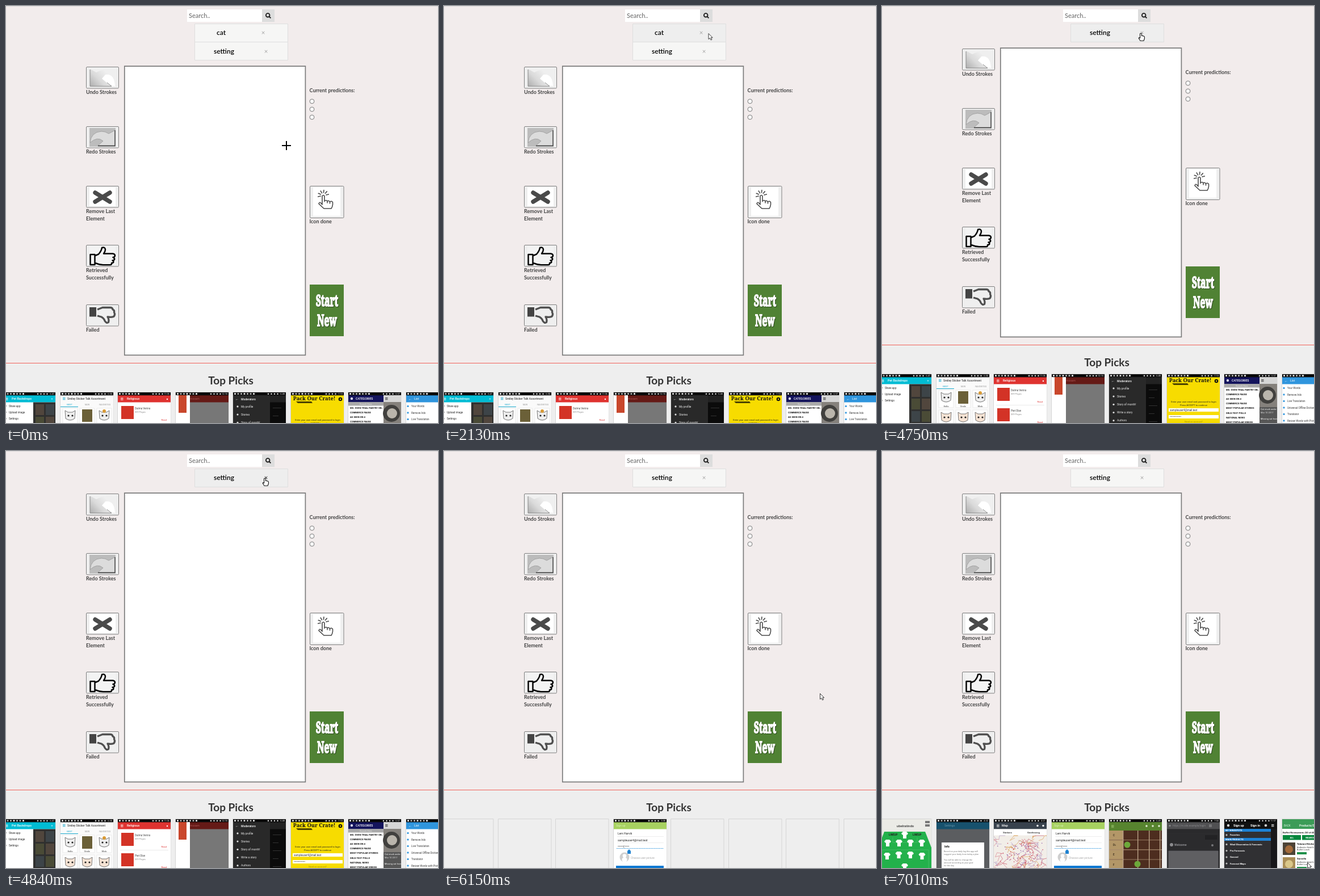
An HTML page with a canvas that plays this animation: 761 px wide and 735 px high, repeating every 7.08 s.

```html
<!DOCTYPE html>
<html lang="en">
<head>
<meta charset="utf-8">
<title>Sketch search</title>
<style>
html, body { margin: 0; width: 100%; height: 100%; overflow: hidden; background: #f2ecec; }
canvas { display: block; }
</style>
</head>
<body>
<canvas id="stage" width="761" height="735"></canvas>
<script>
const c = document.getElementById('stage').getContext('2d');
const LOOP = 7080, STEP = 1000 / 15, REMOVED = 70, REFRESH = 91;

const box = (x, y, w, h, fill) => { c.fillStyle = fill; c.fillRect(x, y, w, h); };
const dot = (x, y, r, fill) => { c.fillStyle = fill; c.beginPath(); c.arc(x, y, r, 0, 7); c.fill(); };
function frame(x, y, w, h, fill, edge, lw = 1, r = 0) {
  c.beginPath(); c.roundRect(x, y, w, h, r);
  c.fillStyle = fill; c.fill();
  c.strokeStyle = edge; c.lineWidth = lw; c.stroke();
}
function shape(d, fill, edge, lw = 1) {
  const p = new Path2D(d);
  if (fill) { c.fillStyle = fill; c.fill(p); }
  if (edge) { c.strokeStyle = edge; c.lineWidth = lw; c.stroke(p); }
}
function text(s, x, y, size, fill = '#444', weight = 700, align = 'left', family = 'Lato, sans-serif') {
  c.font = `${weight} ${size}px ${family}`;
  c.textAlign = align; c.fillStyle = fill; c.fillText(s, x, y);
}
const tiny = (s, x, y, fill = '#222', size = 4.6, weight = 400, align = 'left') =>
  text(s, x, y, size, fill, weight, align, 'Roboto, sans-serif');
function at(x, y, draw) { c.save(); c.translate(x, y); draw(); c.restore(); }
function random(seed) { return () => (seed = seed * 16807 % 2147483647) / 2147483647; }

// ---- pointer -------------------------------------------------------------
const PATH = [
  [0, 494, 246], [4, 553, 150], [9, 536, 30], [11, 536, 30], [14, 482, 35], [16, 482, 35],
  [17, 484, 31], [19, 480, 34], [20, 480, 34], [28, 466, 46], [29, 466, 46], [32, 465.5, 48],
  [35, 462, 74], [37, 460, 66], [40, 452, 51], [45, 452, 51], [46, 456, 51.5], [48, 456, 51.5],
  [49, 456, 49.5], [53, 456, 49.5], [55, 456, 47.5], [89, 456, 47.5], [90, 540, 180], [92, 662, 427],
  [96, 748, 722], [101, 748, 722], [105, 749, 725]
];
function pointer(k) {
  const i = PATH.findIndex(p => p[0] > k);
  if (i < 0) return PATH.at(-1).slice(1);
  const [a, x, y] = PATH[i - 1], [b, u, v] = PATH[i], f = (k - a) / (b - a);
  return [x + (u - x) * f, y + (v - y) * f];
}
function drawPointer(k, x, y) {
  c.lineJoin = 'round';
  at(x, y, () => {
    if (k >= 46 && k < 90)
      shape('M-1.4 7V1.3Q0 -.3 1.4 1.3V5Q3 4.2 3.5 5.4Q5 4.8 5.3 6Q6.4 5.8 6.4 7.4V10L5 13.8H-1L-3.8 9.3Q-4 7.6-1.4 9Z', '#fff', '#111', 1.1);
    else if (x > 209 && x < 527 && y > 107 && y < 615) {
      box(-8, -1, 16, 2, '#000'); box(-1, -8, 2, 16, '#000');
    } else
      shape('M.5 .5V10.5L2.9 8.5L4.6 12L6.4 11.2L4.8 7.8H7.7Z', '#fff', '#222', .9);
  });
}

// ---- search bar and list ---------------------------------------------------
function drawSearch(k, x, y) {
  box(319, 6, 132, 22, '#fff');
  box(451, 6, 22, 22, '#ddd');
  text('Search..', 322, 20.5, 11, '#707070', 500);
  c.strokeStyle = '#222'; c.lineWidth = 1.9;
  c.beginPath(); c.arc(461.2, 16.2, 3.3, 0, 7); c.moveTo(463.5, 18.5); c.lineTo(466.4, 21.4); c.stroke();

  const gone = k >= REMOVED;
  const items = gone ? [['setting', 384, 458]] : [['cat', 379, 453], ['setting', 384, 458]];
  items.forEach(([word, tx, cx], i) => {
    const top = 31 + i * 32.5;
    const over = k !== REMOVED && x > 332 && x < 496 && y > 32 && y > top && y <= top + 32.5;
    const hot = over && (gone ? k >= 72 : i === 0 && k >= 41);
    frame(332.5, Math.floor(top) + .5, 164, 32, over ? '#eee' : '#f6f6f5', '#dedede');
    text(word, tx, top + 20.3, 12, '#000', 600, 'center');
    text('×', cx, top + 20, 11.5, hot ? '#222' : '#a5a5a5', 400, 'center');
  });
}

// ---- tool buttons ----------------------------------------------------------
const TOOLS = [
  ['Undo Strokes', () => {
    box(6, 3, 46, 33, '#f0f0f0');
    const g = c.createLinearGradient(8, 34, 34, 8);
    g.addColorStop(0, '#b0b0b0'); g.addColorStop(.5, '#dadada'); g.addColorStop(1, '#efefef');
    shape('M7 4L18 10Q32 2 51 5V34Q48 20 33 18L30 21L37 28L45 34H7Z', g);
    shape('M34 14Q50 12 51 34L42 33L28 21Z', '#fff');
    shape('M7 5V34.5H45L37 28', null, '#888', 1);
  }],
  ['Redo Strokes', () => {
    box(6, 3, 46, 33, '#bcbcbc');
    shape('M7 29Q9 10 27 9Q34 9 40 13L51 7V34H21L30 26Q20 17 7 29Z', '#dcdcdc', '#999', .8);
    shape('M51 7V34.5H21', null, '#444', 1.4);
  }],
  ['Remove Last|Element', () => {
    box(6, 3, 46, 33, '#fff');
    c.lineCap = 'round';
    shape('M16 12L42 28M42 12L16 28', null, '#4a4a4a', 7.4);
    c.lineCap = 'butt';
  }],
  ['Retrieved|Successfully', () => {
    box(6, 3, 46, 33, '#f3f3f3');
    c.lineJoin = 'round';
    shape('M7.5 17H15.5V35H7.5ZM16 19L22 16.5Q27 11 28 5Q33 3 34 8Q34 12 31 15.5H47Q51 16 51 19Q50.5 22 47.5 22Q51 23.5 50 26Q49 27.5 46.5 27.5Q49.5 29 48 31Q47 32 45 32Q46 35 42 35.3H30Q23 35 16 32', null, '#050505', 2.5);
  }],
  ['Failed', () => {
    box(6, 5, 12, 16.5, '#444');
    c.lineJoin = 'round';
    shape('M20 9L29 5.5H43Q47 6 47 9Q50.5 10 49.5 14Q52 18 48.5 21.5Q45 23 38 22Q41 27 39.5 31.5Q36 34 33 29Q32 25 27 22L20 20', null, '#505050', 3.3);
  }]
];
function drawTools() {
  TOOLS.forEach(([label, icon], i) => at(141, 107 + Math.round(i * 104.8), () => {
    frame(.5, .5, 57, 37.5, '#efefef', '#808080', 1, 1.5);
    icon();
    label.split('|').forEach((s, n) => text(s, 0, 48 + n * 12.6, 9));
  }));
}

function drawPanel() {
  frame(208.8, 106.2, 318.6, 509.2, '#fff', '#7c7c7c', 1.7);
  drawTools();
  text('Current predictions:', 534.5, 151.5, 9);
  for (const y of [168, 182, 196]) {
    c.beginPath(); c.arc(539, y, 3.9, 0, 7);
    c.fillStyle = '#fff'; c.fill(); c.strokeStyle = '#777'; c.lineWidth = 1; c.stroke();
  }
  frame(535.5, 317.5, 59.5, 56, '#efefef', '#808080', 1, 1.5);
  box(541, 320, 48, 50, '#fff');
  at(559, 333, () => {
    c.lineCap = 'round';
    shape('M-2 17V2Q0-1 2 2V11Q5 8 7 11Q9 9 11.5 12Q15 10 16.5 13V17Q16 21 14 24H1L-8 15.5Q-7 12-4.5 14L-2 17M7 11V14M11.5 12V15', null, '#4a4a4a', 1.6);
    for (let i = 0; i < 6; i++) {
      const a = Math.PI * (.93 + i * .2);
      c.beginPath();
      c.moveTo(5 * Math.cos(a), 1 + 5 * Math.sin(a));
      c.lineTo(9.5 * Math.cos(a), 1 + 9.5 * Math.sin(a));
      c.stroke();
    }
    c.lineCap = 'butt';
  });
  text('Icon done', 534.5, 383.3, 9);

  box(535, 491, 60, 91, '#508234');
  for (const [word, y] of [['Start', 529], ['New', 564]])
    at(566, y, () => {
      c.scale(1, 1.7);
      c.lineWidth = 1.2;
      for (const [o, fill] of [[1, '#2c4a1c'], [0, '#fff']]) {
        text(word, o - .5, o * .4, 15.5, fill, 900, 'center', '"Noto Serif", serif');
        c.strokeStyle = fill; c.strokeText(word, o - .5, o * .4);
      }
    });
}

// ---- picks -----------------------------------------------------------------
function statusBar(time) {
  box(0, 0, 93, 5.3, '#080808');
  for (let i = 0; i < 7; i++) box(2 + i * 5.5, 1.2, 3, 2.8, i % 3 ? '#aaa' : '#ddd');
  for (let i = 0; i < 4; i++) dot(62 + i * 5.5, 2.7, 1.3, '#ddd');
  tiny(time, 91, 4.2, '#fff', 4, 400, 'right');
}
const burger = (x, y, fill = '#fff') => { for (let i = 0; i < 3; i++) box(x, y + i * 1.7, 4.5, .8, fill); };
function menu(items, x, y, gap, fill, icon, size = 4.6, weight = 400) {
  items.forEach((s, i) => {
    if (icon) dot(x - 6, y + i * gap - 1.6, 1.6, icon);
    tiny(s, x, y + i * gap, fill, size, weight);
  });
}
function app(time, bg, head, title, tx = 16) {
  box(0, 0, 93, 160, bg);
  box(0, 5, 93, 12.5, head);
  statusBar(time);
  if (title) { burger(5, 9.5); tiny(title, tx, 13.3, '#fff', 5.4, 500); }
}

const FIRST = [
  () => {
    app('6:47', '#fff', '#00bcd4', 'Pet Backdrops');
    box(54, 17.5, 39, 150, '#30302f');
    for (let i = 0; i < 8; i++)
      box(58 + i % 2 * 18, 21 + (i >> 1) * 22, 15, 19, ['#51463d', '#3d4448', '#4a4b36'][i % 3]);
    dot(87, 11.5, 1.2, '#9de');
    menu(['Share app', 'Upload image', 'Settings'], 11, 25.5, 11.2, '#222', '#555');
  },
  () => {
    box(0, 0, 93, 160, '#fafafa'); statusBar('6:50');
    burger(4, 9, '#18a8cc');
    tiny('Smiley Sticker Talk Assortment', 12, 12.5, '#444', 4.8, 500);
    ['BEST', 'NEW', 'FAVORITES'].forEach((s, i) => tiny(s, 16 + i * 31, 22.8, i ? '#999' : '#18a8cc', 4, 400, 'center'));
    box(0, 25, 31, 1, '#18a8cc');
    for (let i = 0; i < 6; i++) {
      const x = 4 + i % 3 * 30, y = 28 + (i / 3 | 0) * 35;
      frame(x, y, 26, 31, '#fff', '#e2e2e2', .7);
      if (i === 1) box(x + 4, y + 2, 18, 22, '#6b6038');
      else {
        shape(`M${x + 4} ${y + 4}L${x + 9} ${y + 7}H${x + 17}L${x + 22} ${y + 4}L${x + 21} ${y + 18}Q${x + 13} ${y + 24} ${x + 5} ${y + 18}Z`, i > 2 ? '#f6e3d4' : '#eee', '#555', .8);
        dot(x + 10, y + 13, 1.6, '#222'); dot(x + 17, y + 13, 1.6, '#222');
        if (i === 2) dot(x + 13, y + 5, 3, '#d99a35');
      }
      tiny(['Hello', 'Smile', 'Wink'][i % 3], x + 13, y + 29.5, '#333', 4, 400, 'center');
    }
  },
  () => {
    app('11:06', '#fff', '#df3330', 'Religious');
    dot(87, 12, 1.2, '#fff');
    ['Dalma Verino', 'Piet Olan'].forEach((s, i) => at(0, i * 36, () => {
      box(6, 24, 22, 23, '#d33326');
      tiny(s, 30, 30, '#444'); tiny('309 Pages', 30, 36, '#888', 4);
      tiny('Read', 86, 50, '#d33', 4.2, 400, 'right');
      box(4, 54, 85, .6, '#ddd');
    }));
  },
  () => {
    app('12:18', '#777', '#651a16');
    tiny('mosam', 25, 13, '#a55', 5);
    box(0, 5, 25, 155, '#fff');
    box(5, 5, 14, 31, '#c9472c');
  },
  () => {
    app('6:48', '#0b0b0b', '#222');
    box(0, 5, 65, 155, '#292929');
    tiny('←', 4, 13.5, '#fff', 6); tiny('Moderators', 14, 13.5, '#fff', 5, 500);
    menu(['My profile', 'Stories', 'Story of month!', 'Write a story', 'Authors'], 14, 26.5, 14.2, '#eee', '#ddd', 4.9);
    for (let i = 0; i < 5; i++) box(70, 27 + i * 14, 15 - i % 2 * 5, .8, '#3c3c3c');
  },
  () => {
    box(0, 0, 93, 160, '#f7dc00'); statusBar('7:10');
    text('Pack Our Crate!', 41, 14, 9.3, '#111', 900, 'center', '"Noto Serif", serif');
    shape('M9 16H36L38 19H12Z', '#4b4300');
    dot(87, 12, 3.3, '#111'); dot(87, 12, 1.2, '#f7dc00');
    tiny('Enter your user email and password to login', 47, 50, '#222', 4.1, 400, 'center');
    tiny('Press ACCEPT to continue', 47, 55.5, '#222', 4.1, 400, 'center');
    box(3, 60, 88, 6, '#fff'); tiny('sampleuser4@mail.test', 5, 64.7);
    box(3, 72, 88, 6, '#fff'); tiny('•••••••••••••', 5, 76.6);
    tiny('Need an account?', 47, 85, '#a38f00', 4, 400, 'center');
  },
  () => {
    app('6:57', '#fff', '#14145c');
    box(62, 5, 31, 155, '#d6d6d6');
    burger(65, 9, '#333');
    tiny('CATEGORIES', 13, 13, '#fff', 5.2, 500); dot(6, 11, 2.2, '#dde');
    box(0, 17, 62, 6.5, '#aaa'); tiny('Search Here', 20, 22, '#eee', 4);
    menu(['MS. OVEN TRIAL PANTRY ON..', 'COMMERCE PAUSE', 'AS SEEN ON 4', 'COMMERCE PAUSE', 'MOST POPULAR STORIES', 'XKLD.TEST POLLS', 'NATIONAL NEWS', 'MOST POPULAR VIDEOS'], 3, 29, 8.1, '#111', null, 4.2, 700);
    box(62, 17, 31, 42, '#85817c');
    dot(76, 37, 15, '#41403e'); dot(77, 37, 9, '#bab5ac');
    box(62, 58, 31, 28, '#575757');
    tiny('Cat stuck under', 64, 63, '#fff', 4); tiny('Mar 10 2017', 64, 69, '#ddd', 4);
    tiny('Missing cat from', 64, 80, '#fff', 4);
  },
  () => {
    app('6:47', '#fff', '#2f95dd');
    tiny('←', 4, 13.5, '#fff', 6); tiny('List', 14, 13.3, '#fff', 5.2);
    menu(['Your Words', 'Remove Ads', 'Live Translation', 'Universal Offline Dictionary', 'Translator', 'Review Words with Pictures'], 9, 26, 11.5, '#333', '#2f95dd', 4.5);
  }
];

const SECOND = [
  () => {
    box(0, 0, 93, 160, '#ebebe6');
    tiny('ubelratindo', 47, 13.5, '#333', 6, 500, 'center');
    box(82, 3, 8, 4, '#777'); box(82, 9, 8, 4, '#777');
    shape('M0 160V48L10 22H82L93 50V160Z', '#23b14b');
    shape('M6 86V54H88V86M25 32V41H68V32', null, '#58c877', .6);
    tiny('LINEUP', 18, 29, '#222', 4.5, 700); tiny('LINEUP', 60, 29, '#222', 4.5, 700);
    const shirt = (x, y) => at(x, y, () => shape('M-6-3L-3-6H3L6-3L4 0L3-1V6H-3V-1L-4 0Z', '#fff'));
    shirt(46, 28);
    for (let i = 0; i < 4; i++) { shirt(16 + i * 20, 42); shirt(15 + i * 20.5, 63 - (i % 3 ? 0 : -2)); }
    shirt(46, 84);
  },
  () => {
    app('4:32', '#5b5d60', '#17516d');
    tiny('Settings', 14, 13.2, '#6693a8', 5);
    box(9, 41, 75, 90, '#fff');
    tiny('Info', 14, 50, '#111', 5, 700);
    menu(['Based on your daily log this app will', 'suggest your body from today a plan', '', 'You will be able to change the', 'amount according to your goal', 'for the day', '', 'Every week a new plan starts'], 13, 58, 5, '#777', null, 3.8);
  },
  () => {
    app('4:21', '#f2eee8', '#38424d', 'Map', 14);
    dot(77, 11.5, 1.7, '#fff'); dot(87, 11.5, 1.7, '#fff');
    box(0, 17.5, 93, 11, '#fff');
    tiny('Stations', 24, 25, '#222', 4.3, 500, 'center'); tiny('Geofencing', 70, 25, '#222', 4.3, 500, 'center');
    const r = random(77);
    for (let i = 0; i < 65; i++) {
      let x = 48 + (r() - .5) * 86, y = 64 + (r() - .5) * 66;
      c.strokeStyle = ['#d88792', '#b6a1c8', '#dca45c', '#c85e70'][i % 4]; c.lineWidth = .7;
      c.beginPath(); c.moveTo(x, Math.max(y, 29));
      for (let n = 0; n < 4; n++) c.lineTo(x += (r() - .5) * 23, Math.max(29, y += (r() - .5) * 20));
      c.stroke();
    }
    for (let i = 0; i < 75; i++) dot(48 + (r() + r() - 1) * 42, 64 + (r() + r() - 1) * 32, .8, i % 2 ? '#c53a54' : '#905aa8');
  },
  () => {
    app('5:08', '#fff', '#a7d160');
    tiny('Sign up', 4, 13, '#d8efb6', 5);
    tiny('Lem Harvik', 7, 27, '#222', 5); box(6, 30, 82, .5, '#ddd');
    tiny('sampleuser4@mail.test', 7, 38.5, '#222', 5); box(6, 41, 82, .5, '#ddd');
    tiny('••••••(•••••', 7, 49.5, '#222', 5);
    for (let x = 5; x < 88; x += 2.6) box(x, 51, 1.6, 1, '#3a9ce0');
    shape('M27 53L30 56V61H24V56Z', '#1f82d0');
    dot(19, 67, 8.5, '#cfcfcf'); dot(19, 64.5, 3.3, '#fff'); dot(19, 71.5, 4.5, '#fff');
    tiny('Choose user picture', 30, 70, '#aaa', 4.7);
    box(4, 82, 84, 12, '#0c78d2');
  },
  () => {
    app('6:49', '#4d2d1f', '#57842f');
    box(0, 5, 93, 15, '#57842f'); burger(4, 10.5, '#a9d17b');
    for (let i = 0; i < 3; i++) dot(66 + i * 11, 12, 1.8, '#e0ead2');
    box(0, 20, 24, 140, '#b39768');
    for (let i = 0; i < 4; i++) {
      box(0, 36 + i * 17.2, 93, 1.2, i % 2 ? '#a88a6e' : '#8d7058');
      tiny(['C', 'D♭', 'E', 'F'][i], 7, 30 + i * 17.2, '#403320', 4.5, 700);
    }
    for (const x of [24, 50, 70, 89]) box(x, 20, 1.4, 140, '#b9a187');
    dot(32, 45, 5.5, '#6ca83a'); dot(50, 79, 5.5, '#6ca83a');
  },
  () => {
    app('7:04', '#303032', '#505052');
    tiny('https://m.site.example/login', 10, 13, '#858588', 4.6); dot(5, 11.5, 1.7, '#858588');
    box(74, 9, 5, 5, '#747476');
    box(0, 17.5, 93, 8, '#2a2a2c');
    box(0, 26, 93, 30, '#2b2b2d');
    dot(8, 45, 3, '#8b8b8e'); tiny('Welcome', 13, 47, '#909094', 5.2, 700);
    box(67, 28, 22, 8, '#222224'); dot(80, 46, 2, '#77777a');
    frame(3, 56, 87, 80, '#5f5f62', '#66666a', .7);
  },
  () => {
    app('11:57', '#303033', '#111');
    dot(7, 11, 2.2, '#ddd');
    tiny('Sign up', 16, 13.3, '#fff', 5.5, 700); tiny('Sign in', 46, 13.3, '#fff', 5.5, 700);
    dot(73, 11, 2.3, '#ccc'); burger(83, 9);
    box(82, 17, 11, 140, '#17171a');
    box(0, 17, 82, 5, '#1d82d5'); tiny('MY WINDSPOTS', 2, 21.2, '#fff', 4, 700);
    box(0, 33, 82, 5, '#1d82d5'); tiny('MAIN PRODUCTS', 2, 37.2, '#fff', 4, 700);
    menu(['Favorites'], 10, 29.4, 11, '#fff', '#bbb', 4.2, 700);
    menu(['Wind Observation & Forecasts', 'Pro Forecasts', 'General', 'Forecast Maps'], 10, 46, 11.2, '#fff', '#bbb', 4.2, 700);
  },
  () => {
    box(0, 0, 93, 160, '#fff');
    box(0, 0, 93, 17, '#3c9c58');
    tiny('BACK', 3, 12.5, '#d9f2df', 4.6); tiny('Products/Services', 30, 12.8, '#fff', 5.3, 500);
    tiny('Buffet Restaurants (50 of 48)', 1, 24.5, '#222', 4.4, 700);
    box(1, 28, 32, 8.5, '#07873d'); box(35, 28, 50, 8.5, '#07873d');
    tiny('ALL', 17, 34, '#fff', 4, 700, 'center'); tiny('NEAREST', 50, 34, '#fff', 4, 700, 'center');
    ['Talurani Kitchen', 'Sorvella'].forEach((s, i) => at(0, 40 + i * 26, () => {
      box(1, 1, 22, 22, i ? '#a98d56' : '#4d4336'); dot(12, 13, 7, i ? '#dac789' : '#a36a3a');
      tiny(s, 26, 5.3, '#111', 4.4, 700);
      tiny('Authentic Halal Indonesian', 26, 10.5, '#333', 3.9); tiny('Buffet Lunch', 26, 15.3, '#333', 3.9);
      box(26, 18, 17, 4, '#20914c');
    }));
  }
];
const LOADED = [103, 102, 102, 91, 103, 104, 105, 105];

function drawPicks(k) {
  box(0, 629, 761, 140, '#eee');
  box(0, 629, 761, 1, '#f0625a');
  text('Top Picks', 396, 666.7, 19, '#333', 700, 'center');
  for (let i = 0; i < 8; i++) at(Math.round(-5.8 + i * 101.5), 681, () => {
    frame(-.5, -.5, 93.5, 162, '#eee', '#d5d5d5');
    const draw = k < REFRESH ? FIRST[i] : k >= LOADED[i] && SECOND[i];
    if (!draw) return;
    c.beginPath(); c.rect(0, 0, 93, 160); c.clip();
    draw();
  });
}

// ---- timeline --------------------------------------------------------------
function draw(ms) {
  const k = Math.floor((ms % LOOP + 8) / STEP), [x, y] = pointer(k);
  c.lineJoin = 'miter';
  box(0, 0, 761, 735, '#f2ecec');
  box(0, 0, 761, 1, '#dcdada');
  drawSearch(k, x, y);
  at(0, k < REMOVED ? 0 : -32, () => { drawPanel(); drawPicks(k); });
  drawPointer(k, x, y);
}
const start = performance.now();
function tick() {
  draw(performance.now() - start);
  requestAnimationFrame(tick);
}
tick();
</script>
</body>
</html>
```
